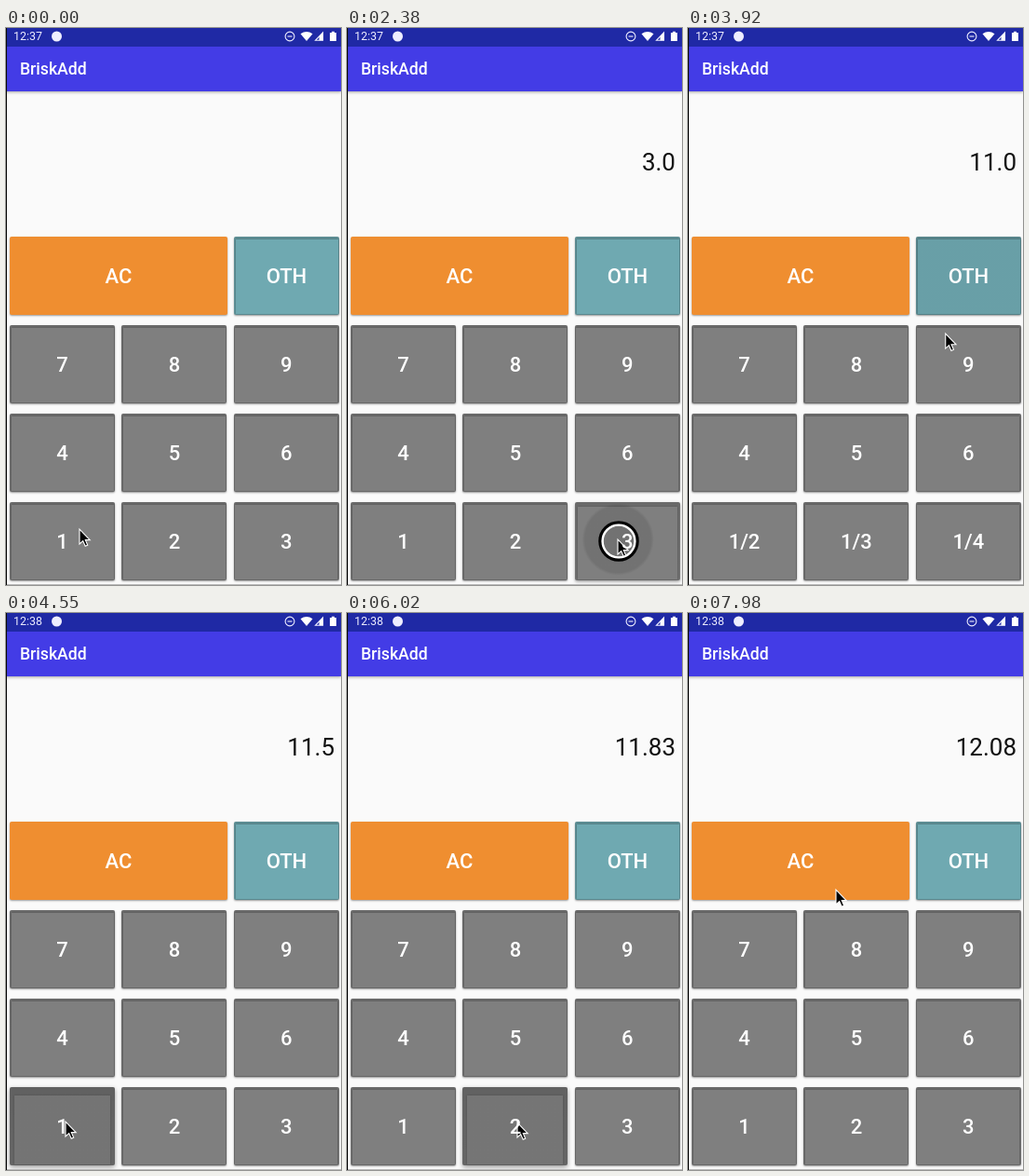
Animation, 360 px wide and 598 px high, one loop 8 s. Source, as an HTML page:

```html
<!DOCTYPE html>
<html lang="en">
<head>
<meta charset="utf-8">
<title>BriskAdd</title>
<style>
  html, body { margin: 0; width: 100%; height: 100%; overflow: hidden; background: #fafafa; }
  body { font-family: Roboto, Arial, sans-serif; }
  #stage { position: absolute; left: 0; top: 0; width: 360px; height: 598px; overflow: hidden; background: #fafafa; }
  #status { position: absolute; left: 0; top: 0; width: 100%; height: 20px; background: #1f29a5; }
  #clock { position: absolute; left: 8px; top: 0; font-size: 12.4px; line-height: 18.5px; color: #eef; }
  #bar {
    position: absolute; left: 0; top: 20px; width: 345px; height: 48px; padding-left: 15px;
    background: #433ce6; color: #fff; font-weight: 500; font-size: 17.6px; line-height: 49px;
    box-shadow: 0 1px 3px rgba(0, 0, 0, .35);
  }
  #display { position: absolute; right: 7px; top: 129px; font-size: 26px; line-height: 30px; color: #111; }
  .key {
    position: absolute; height: 84px; border-radius: 2px; color: #fff; text-align: center;
    font-weight: 500; font-size: 22px; line-height: 86px;
    background: linear-gradient(rgba(0, 0, 0, .17), rgba(0, 0, 0, .13)) var(--color);
    box-shadow: 0 calc(1px + 1px * var(--z)) calc(2px + 3px * var(--z)) rgba(0, 0, 0, .38);
    --z: 0; --ink: 0; --r: 0px; --x: 0px; --y: 0px;
  }
  .key::before, .key::after { content: ""; position: absolute; }
  .key::before {
    inset: calc(3px + 6px * var(--z)) calc(1.5px + 3.5px * var(--z)) 1px;
    background: var(--color); box-shadow: 0 0 2px rgba(0, 0, 0, .22);
  }
  .key.solid { background: var(--color); }
  .key.solid::before { display: none; }
  .key::after {
    inset: 0; border-radius: 2px;
    background: radial-gradient(circle var(--r) at var(--x) var(--y), rgba(0, 0, 0, var(--ink)) 92%, transparent 100%);
  }
  .key span { position: relative; z-index: 1; }
  svg { position: absolute; left: 0; top: 0; }
  #edge { position: absolute; left: 0; top: 0; width: 1px; height: 598px; background: #080808; }
  #foot { position: absolute; left: 0; top: 597px; width: 360px; height: 1px; background: #bbb; }
</style>
</head>
<body>
<div id="stage">
  <div id="bar">BriskAdd</div>
  <div id="status"><div id="clock">12:37</div></div>
  <div id="display"></div>
  <div id="keys"></div>
  <div id="foot"></div>
  <div id="edge"></div>
  <svg width="360" height="598" fill="none">
    <circle cx="54.5" cy="9" r="5.5" fill="#eef"/>
    <g stroke="#eef" stroke-width="1.1">
      <circle cx="305" cy="9" r="4.9"/>
      <path d="M302.5 9h5"/>
      <path d="M332.5 13.3h8V4.8z"/>
    </g>
    <path d="M316.5 6.3q6.5-4.8 13 0L323 14zM336.5 9.2l4-4.4v8.5h-4z" fill="#fff"/>
    <path d="M348 5h2V3.8h3V5h2v9h-7z" fill="#fff"/>
    <g id="ring">
      <circle r="20" stroke="#000" stroke-width="3.5"/>
      <circle r="17.4" stroke="#fff" stroke-width="2.4"/>
    </g>
    <path id="cursor" d="M0 0V16L3.7 12.6 6.2 18.3 8.7 17.2 6.3 11.6H11.2Z" fill="#000" stroke="#fff" stroke-width="1.1"/>
  </svg>
</div>
<script>
const LOOP = 8000;
const $ = id => document.getElementById(id);
const clamp = v => Math.max(0, Math.min(1, v));
const smooth = v => v * v * (3 - 2 * v);

// Pointer moves: start, end, destination x, y
const HOME = [79, 538];
const moves = [
  [500, 820, 79, 541], [850, 1000, 78, 561], [1340, 1680, 182, 556], [1900, 2240, 291, 549],
  [2760, 2960, 190, 455], [3110, 3300, 312, 292], [3800, 4310, 64, 546], [4640, 5050, 323, 266],
  [5340, 5700, 183, 547], [6250, 6430, 318, 268], [6700, 7050, 298, 556], [7350, 7900, 159, 297]
];

// Taps: press, release, key, amount added
const taps = [
  [1060, 1180, "1", 1], [1740, 1850, "2", 2], [2340, 2460, "3", 3], [2970, 3080, "5", 5],
  [3480, 3700, "OTH"], [4380, 4480, "1", 1 / 2], [5150, 5270, "OTH"], [5720, 5900, "2", 1 / 3],
  [6500, 6610, "OTH"], [7090, 7210, "3", 1 / 4]
];
const fractions = { 1: "1/2", 2: "1/3", 3: "1/4" };

const keys = {};
function addKey(name, x, y, width, color, solid) {
  const el = document.createElement("div");
  el.className = solid ? "key solid" : "key";
  el.style.cssText = `left:${x}px;top:${y}px;width:${width}px;--color:${color}`;
  const label = el.appendChild(document.createElement("span"));
  label.textContent = name;
  $("keys").append(el);
  keys[name] = { el, label, x, y };
}
addKey("AC", 4, 224, 234, "#ef8e30", true);
addKey("OTH", 245, 224, 113, "#6fa9b1");
for (let n = 1; n <= 9; n++) {
  const col = (n - 1) % 3, row = Math.floor((n - 1) / 3);
  addKey(String(n), 4 + col * 120.4, 509 - row * 95, 113, "#7f7f7f");
}

function pointerAt(t) {
  let [x, y] = HOME;
  for (const [start, end, toX, toY] of moves) {
    if (t < start) break;
    const p = smooth(clamp((t - start) / (end - start)));
    x += (toX - x) * p;
    y += (toY - y) * p;
  }
  return [x, y];
}

function setKey(key, z, ink, radius, x, y) {
  const vars = { z, ink, r: radius + "px", x: x - key.x + "px", y: y - key.y + "px" };
  for (const name in vars) key.el.style.setProperty("--" + name, vars[name]);
}

function formatSum(sum, count) {
  if (!count) return "";
  if (count === 1) return String(sum);
  const text = String(Math.round(sum * 100) / 100);
  return text.includes(".") ? text : text + ".0";
}

function render(t) {
  const [x, y] = pointerAt(t);
  const place = `translate(${x} ${y})`;
  let sum = 0, count = 0, showFractions = false, pressed = false;

  for (const name in keys) setKey(keys[name], 0, 0, 0, 0, 0);
  for (const [down, up, name, amount] of taps) {
    if (t < down) break;
    if (t < up) pressed = true;
    else {
      showFractions = name === "OTH";
      if (amount) { sum += amount; count++; }
    }
    const z = clamp((t - down) / 100) * (1 - clamp((t - up - 120) / 100));
    const ink = 0.1 * (1 - clamp((t - up) / 550));
    if (ink > 0) setKey(keys[name], z, ink, 15 + 130 * clamp((t - down) / 225), ...pointerAt(down));
  }

  for (const n in fractions) keys[n].label.textContent = showFractions ? fractions[n] : n;
  $("display").textContent = formatSum(sum, count);
  $("clock").textContent = t < 4550 ? "12:37" : "12:38";
  $("cursor").setAttribute("transform", place);
  $("ring").setAttribute("transform", `translate(${x + 1} ${y + 2})`);
  $("ring").setAttribute("visibility", pressed ? "visible" : "hidden");
}

const began = performance.now();
function tick() {
  render((performance.now() - began) % LOOP);
  requestAnimationFrame(tick);
}
tick();
</script>
</body>
</html>
```
